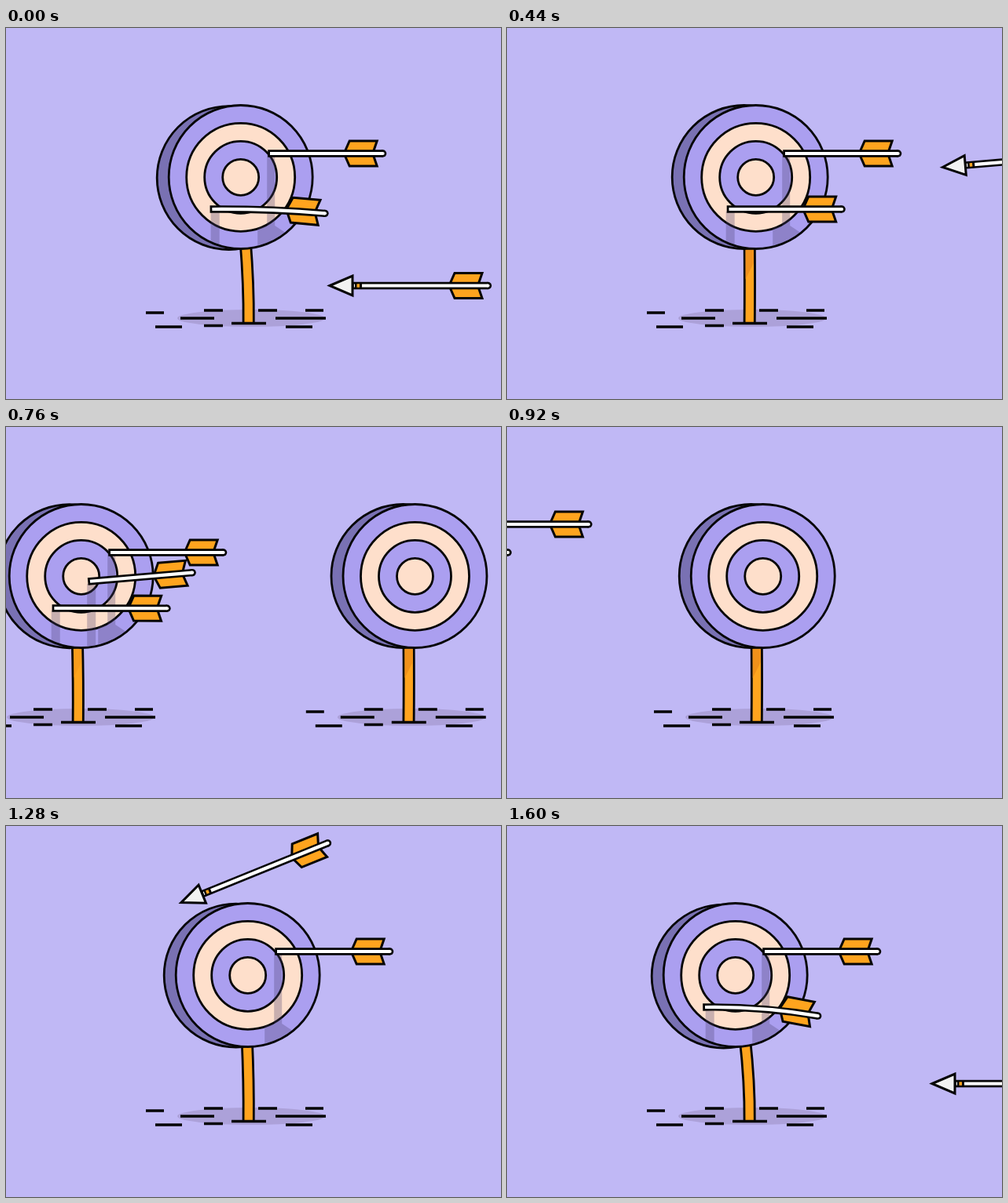
Write an HTML page with a canvas that moves like this. It is 630 px wide and 473 px high and loops after 1.62 s.

```html
<!DOCTYPE html>
<html lang="en">
<head>
<meta charset="utf-8">
<title>Archery</title>
<style>
  html, body { margin: 0; width: 100%; height: 100%; overflow: hidden; background: #c0b8f5; }
  canvas { display: block; width: 100%; height: 100%; }
</style>
</head>
<body>
<canvas id="stage" width="630" height="473"></canvas>
<script>
const ctx = document.getElementById('stage').getContext('2d');
const LOOP = 1620, STEP = 20, SPEED = 6.45;
const REST = 8, BASE = 308.7, CY = 190;
const INK = '#050505', BG = '#c0b8f5', LILAC = '#ab9ff0', PEACH = '#fedfcb',
      BACK = '#7971b3', ORANGE = '#ffa41e', SHADE = 'rgba(75,65,110,.3)';

// sideways lean of the board by time since the last hit
const SWING = [[0, -25], [20, -18], [40, -10], [70, 4], [100, 13], [130, 14],
               [220, -2], [260, -1], [280, 4], [340, REST]];

// arrows that hit: resting place relative to the face, and angle
const HITS = [
  { dx: 34.5, y: 160, angle: 0, fletchShadow: true },
  { dx: -37, y: 231, angle: 0, bends: true },
  { dx: 8.5, y: 197, angle: -0.085 }
];

// arrows that miss: tip position at a given time, direction, speed
const MISSES = [
  { at: -20, x: 540, y: 328.5, angle: 0, speed: SPEED },
  { at: 180, x: 540, y: 60.7, angle: 0, speed: SPEED },
  { at: 821, x: 540, y: 124, angle: 0, speed: SPEED },
  { at: 1280, x: 222, y: 98, angle: -0.386, speed: 2.08 },
  { at: 1600, x: 540, y: 328.5, angle: 0, speed: SPEED }
];

const GROUND = [[178, 201, 363], [252, 276, 360], [321, 345, 360], [381, 404, 360],
                [222, 265, 370], [343, 407, 370], [252, 276, 379.5],
                [190, 224, 381], [356, 390, 381], [287, 331, 376.5]];

function swing(age) {
  const i = SWING.findIndex(k => k[0] > age);
  if (i < 0) return REST;
  const [t0, a] = SWING[i - 1], [t1, b] = SWING[i];
  return a + (b - a) * (age - t0) / (t1 - t0);
}

function slide(u, dist) {
  const p = Math.min(1, Math.max(0, u / 560));
  return dist / 2 * (1 - Math.cos(Math.PI * p));
}

function at(x, y, angle, draw) {
  ctx.save();
  ctx.translate(x, y);
  ctx.rotate(angle);
  draw();
  ctx.restore();
}

function poly(points, fill, line = 3) {
  ctx.beginPath();
  points.forEach(p => ctx.lineTo(...p));
  ctx.closePath();
  ctx.fillStyle = fill;
  ctx.fill();
  if (!line) return;
  ctx.lineWidth = line;
  ctx.strokeStyle = INK;
  ctx.stroke();
}

function disc(x, y, r, fill) {
  ctx.beginPath();
  ctx.arc(x, y, r, 0, 7);
  ctx.fillStyle = fill;
  ctx.fill();
  ctx.lineWidth = 2.8;
  ctx.strokeStyle = INK;
  ctx.stroke();
}

function rod(from, len, drop, half, color) {
  const end = len - 4.6;
  ctx.beginPath();
  ctx.moveTo(from, 0);
  ctx.quadraticCurveTo(len / 2, -drop * 0.1, end, drop);
  ctx.lineWidth = half * 2;
  ctx.strokeStyle = color;
  ctx.stroke();
  ctx.beginPath();
  ctx.arc(end, drop, half, 0, 7);
  ctx.fillStyle = color;
  ctx.fill();
}

function shaft(len, drop = 0) {
  at(len, drop, Math.atan(drop / 60), () => poly([
    [-47, -16], [-12, -16], [-17.5, 0], [-12, 16], [-47, 16], [-54, 0]
  ], ORANGE));
  rod(0, len, drop, 4.7, INK);
  rod(2.8, len, drop, 2.1, '#fff');
}

function flyingArrow(x, y, angle) {
  at(x, y, angle, () => {
    ctx.translate(29, 0);
    shaft(178);
    ctx.fillStyle = INK;
    ctx.fillRect(4, -4, 9, 8);
    ctx.fillStyle = ORANGE;
    ctx.fillRect(6.5, -2.2, 3.5, 4.4);
    poly([[-28, 0], [1, -12.5], [1, 12.5]], '#f2f2f2');
  });
}

function post(lean) {
  const top = (lean - REST) * 0.2;
  for (const [width, color] of [[16, INK], [10.4, ORANGE]]) {
    ctx.beginPath();
    ctx.moveTo(BASE, 376);
    ctx.quadraticCurveTo(BASE + 0.5, 328, BASE + top * 1.15, 270);
    ctx.lineWidth = width;
    ctx.strokeStyle = color;
    ctx.stroke();
  }
  ctx.globalAlpha = Math.min(1, Math.max(0, (lean - 2) / 5));
  const x = BASE + top;
  poly([[x - 5, 275], [x + 5, 275], [x + 5, 300], [x - 5, 320]], '#f0911a', 0);
  ctx.globalAlpha = 1;
}

function ground() {
  ctx.beginPath();
  ctx.ellipse(312, 370, 94, 11, 0, 0, 7);
  ctx.fillStyle = '#aca1d9';
  ctx.fill();
}

function dashes() {
  ctx.beginPath();
  for (const [a, b, y] of GROUND) {
    ctx.moveTo(a, y);
    ctx.lineTo(b, y);
  }
  ctx.lineWidth = 3.4;
  ctx.strokeStyle = INK;
  ctx.stroke();
}

function castShadows(cx, count) {
  ctx.save();
  ctx.beginPath();
  ctx.arc(cx, CY, 90, 0, 7);
  ctx.clip();
  ctx.fillStyle = SHADE;
  HITS.slice(0, count).forEach(h => {
    const x = cx + h.dx - 1;
    ctx.beginPath();
    if (h.fletchShadow) {
      [[0, 162], [10, 162], [10, 252], [25, 262], [8, 274], [-12, 282], [-12, 255], [0, 252]]
        .forEach(p => ctx.lineTo(x + p[0], p[1]));
    } else {
      ctx.rect(x, h.y + 3, 11, 100);
    }
    ctx.fill();
  });
  ctx.restore();
}

function board(x, lean, count) {
  ctx.save();
  ctx.translate(x, 0);
  ground();
  post(lean);
  dashes();
  const cx = BASE + lean, sag = REST - lean;
  disc(cx - 15, CY + Math.max(0, sag) * 0.06, 91.5, BACK);
  [[91.5, LILAC], [69, PEACH], [46, LILAC], [23, PEACH]].forEach(([r, c], i) =>
    disc(cx, CY + (i ? 0.3 : 0), r, c));
  castShadows(cx, count);
  HITS.slice(0, count).forEach(h => {
    const drop = h.bends && sag > 0 ? 0.0165 * sag * sag : 0;
    at(cx + h.dx - drop * 0.4, h.y, h.angle, () => shaft(h.angle ? 138 : 151, drop));
  });
  ctx.restore();
}

function incoming(t, hitTime, h) {
  const left = hitTime - t;
  if (left <= 0 || left > 120) return;
  const len = h.angle ? 138 : 151;
  const d = 40 + SPEED * left + len - 207;
  const x = BASE + REST + h.dx + d * Math.cos(h.angle);
  flyingArrow(x, h.y + d * Math.sin(h.angle), h.angle);
}

function draw(t) {
  ctx.fillStyle = BG;
  ctx.fillRect(0, 0, 630, 473);

  for (const m of MISSES) {
    const d = m.speed * (m.at - t);
    if (Math.abs(d) < 1200) {
      flyingArrow(m.x + d * Math.cos(m.angle), m.y + d * Math.sin(m.angle), m.angle);
    }
  }

  if (t < 1000) {
    const third = t >= 480;
    board(-slide(t - 540, 648), swing(third ? t - 480 : t + 40), third ? 3 : 2);
  }
  if (t > 500) {
    const count = t >= 1580 ? 2 : t >= 1020 ? 1 : 0;
    const lean = count ? swing(t - (count > 1 ? 1580 : 1020)) : REST;
    board(slide(960 - t, 720), lean, count);
  }

  incoming(t, 1020, HITS[0]);
  incoming(t, 1580, HITS[1]);
  incoming(t, 480, HITS[2]);
}

const begin = performance.now();
function tick() {
  const t = (performance.now() - begin) % LOOP;
  draw(Math.floor(t / STEP) * STEP);
  requestAnimationFrame(tick);
}
tick();
</script>
</body>
</html>
```
